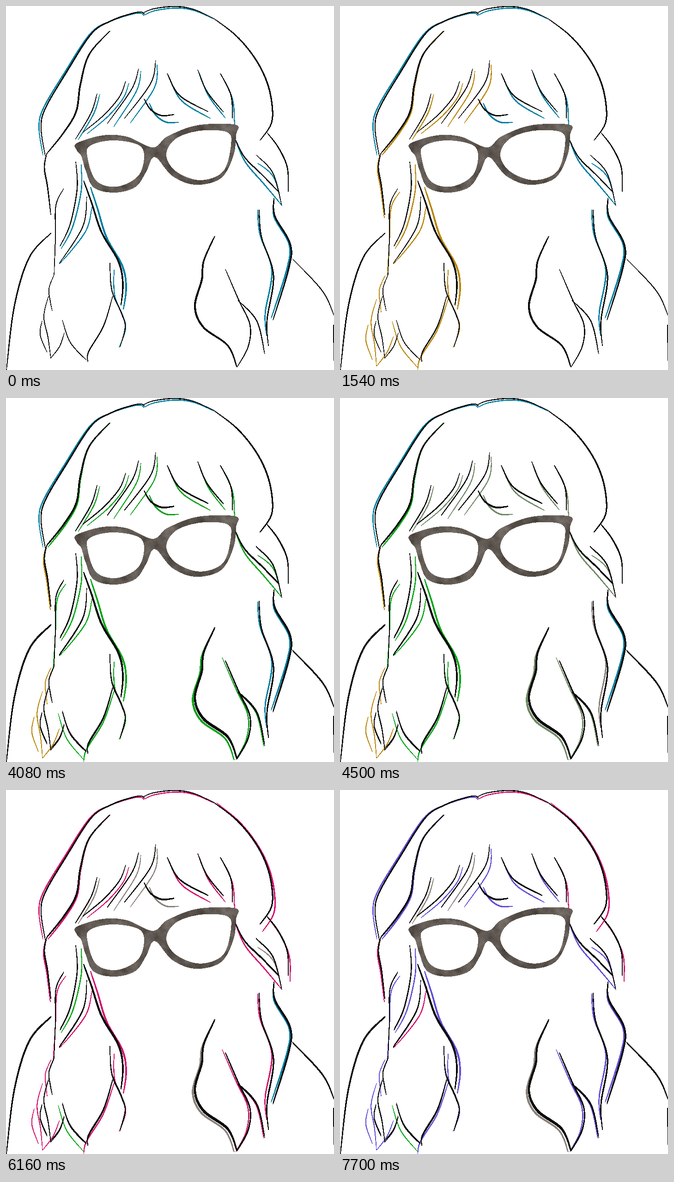
Recreate the animation shown at these times as an HTML page. Size 710 by 788 pixels, loop 8 s.

```html
<!DOCTYPE html>
<html lang="en">
<head>
<meta charset="utf-8">
<title>Line portrait with glasses</title>
<style>
html, body { margin: 0; width: 100%; height: 100%; overflow: hidden; background: #fff; }
svg { display: block; width: 100%; height: 100%; }
</style>
</head>
<body>
<svg viewBox="0 0 710 788" shape-rendering="crispEdges">
  <filter id="mottle" x="0" y="0" width="1" height="1" color-interpolation-filters="sRGB">
    <feTurbulence type="fractalNoise" baseFrequency=".035" numOctaves="4" seed="4"/>
    <feColorMatrix values=".35 0 0 0 .21  .35 0 0 0 .18  .35 0 0 0 .155  0 0 0 0 1"/>
    <feComposite in2="SourceAlpha" operator="in"/>
  </filter>
  <g id="shadows"></g>
  <use id="echo" href="#ink" transform="scale(1 .9965)"/>
  <g id="ink" fill="#0b0b0b">
    <path id="glasses" filter="url(#mottle)" fill-rule="evenodd"/>
  </g>
</svg>
<script>
const COLORS = {
  b: [0, 127, 162], g: [184, 134, 11], n: [4, 166, 20],
  y: [140, 130, 123], p: [212, 20, 110], v: [96, 80, 216]
};
const inkLayer = document.getElementById('ink');
const shadowLayer = document.getElementById('shadows');
const echo = document.getElementById('echo');
const shadows = [];

const parse = text => text.split(' ').map(pair => pair.split(',').map(Number));
const outline = points => 'M' + points.map(p => p.map(v => v.toFixed(2))).join('L') + 'Z';

// Samples a Catmull-Rom curve through the key points.
function smooth(keys, closed = false) {
  const count = keys.length, spans = closed ? count : count - 1, steps = 10, curve = [];
  const key = i => keys[closed ? (i + count) % count : Math.max(0, Math.min(count - 1, i))];
  for (let n = 0; n <= spans * steps; n++) {
    const i = Math.min(spans - 1, Math.floor(n / steps)), t = n / steps - i;
    const [a, b, c, d] = [-1, 0, 1, 2].map(k => key(i + k));
    curve.push([0, 1].map(k => {
      const cubic = 3 * (b[k] - c[k]) + d[k] - a[k];
      const square = 2 * a[k] - 5 * b[k] + 4 * c[k] - d[k];
      return b[k] + .5 * t * (c[k] - a[k] + t * (square + t * cubic));
    }));
  }
  return curve;
}

// Adds a curve as a brush stroke that swells in the middle.
function brush(layer, curve, width) {
  const end = curve.length - 1, left = [], right = [];
  curve.forEach(([x, y], n) => {
    const [x0, y0] = curve[Math.max(0, n - 1)], [x1, y1] = curve[Math.min(end, n + 1)];
    const length = Math.hypot(x1 - x0, y1 - y0) || 1;
    const swell = Math.sqrt(Math.max(0, Math.sin(Math.PI * n / end)));
    const half = Math.max(.65, width * (.4 + .6 * swell) / 2);
    const dx = (y0 - y1) / length * half, dy = (x1 - x0) / length * half;
    left.push([x + dx, y + dy]);
    right.unshift([x - dx, y - dy]);
  });
  const shape = document.createElementNS('http://www.w3.org/2000/svg', 'path');
  shape.setAttribute('d', outline([...left, ...right]));
  layer.append(shape);
  return shape;
}

const ink = (keys, width) => brush(inkLayer, smooth(parse(keys)), width);

// A black strand with a coloured shadow, whose offset glides from `start` to `end`.
// `states` holds one colour letter per hold; "-" is hidden.
function hair(keys, width, states, start, end = start) {
  ink(keys, width);
  const [from, to] = parse(`${start} ${end}`), curve = smooth(parse(keys));
  const shifted = curve.map((point, n) => point.map((v, k) =>
    v + from[k] + (to[k] - from[k]) * n / (curve.length - 1)));
  shadows.push({ states, shape: brush(shadowLayer, shifted, width + .2) });
}

// Crown and outer hair
hair('300,18 292,13 270,17 228,32 185,60 130,145 85,222 76,265 85,325', 3, 'bbbbpv', '-1,3', '-5,-2');
hair('297,15 320,6 365,1 405,7 450,27', 2.4, 'bbbbpp', '2,5', '2,2');
hair('450,27 500,66 540,115 565,165 576,215 574,255 550,291', 3.4, '----pp', '6,1', '5,16');
hair('565,274 590,307 609,350 611,402', 2.8, '----pp', '5,6', '4,13');
hair('225,54 180,105 161,170 152,228 125,274 88,320', 3.8, '-gnnpv', '-1,0', '3,3');
hair('88,320 83,350 90,392 97,452', 3, '-gggpp', '-2,3', '-1,7');
// Fringe
hair('197,190 184,232 150,289', 2.2, 'bgnyyy', '6,1');
hair('259,163 246,196 212,236 166,274', 2.2, 'bgnypv', '7,4', '9,3');
hair('287,136 272,180 219,255', 2.2, 'bgnyyy', '5,5', '14,7');
hair('324,118 313,168 256,244', 2.2, 'bgnyyv', '3,9', '13,10');
hair('299,201 313,224 336,237 364,235', 3.2, 'bbnyyv', '11,9', '10,17');
hair('349,146 376,194 438,229', 2.8, 'bbnypv', '4,8', '5,15');
hair('415,138 435,185 471,230', 2.5, 'bbnypv', '3,6', '4,13');
hair('464,146 487,193 490,243', 2.6, 'bbnypp', '1,1', '5,15');
// Locks beside the face
hair('497,290 517,328 555,366 592,404', 2.8, 'bbnypv', '0,2', '5,28');
hair('541,322 578,362 597,432', 2.2, 'bbnyyv', '3,18', '0,0');
hair('151,337 154,395 139,472 117,520', 2.5, 'bgnnnv', '12,6', '2,6');
hair('175,413 166,478 115,558', 2.3, 'bgnnpp', '12,20', '0,1');
hair('168,378 185,425 207,490 243,552 253,600 249,648', 4, 'bgnnpv', '15,14', '5,9');
hair('225,556 229,615 250,665 258,695 247,738', 2.6, 'bgnnpv', '9,15', '-2,1');
hair('231,628 211,693 179,748 177,770', 2.6, '-gnnpv', '4,4', '-9,17');
// Lower left ends
hair('125,395 108,432 107,500 104,582', 2.2, '-gnnpv', '5,7', '-2,1');
hair('104,582 93,612 96,640 100,660', 2, '-gggpv', '-6,1', '-11,3');
hair('92,628 82,672 91,718 97,763', 2.1, '-gggpv', '-13,7', '-18,17');
hair('78,682 74,712 89,750', 2, '-gggpv', '-17,8', '-19,16');
hair('97,762 116,737 126,708', 2, '-gggpv', '-18,18', '-10,7');
hair('122,680 139,728 174,767', 2, '-gnnnn', '-9,3', '-6,16');
// Shoulders
ink('98,491 50,545 18,650 1,788', 3.2);
ink('620,547 685,617 710,670', 2.2);
ink('709,690 710,768', 2);
// Right locks
hair('452,498 428,552 424,592 409,650 427,695 480,735 500,782', 4.4, '--nyyy', '-3,5', '-6,2');
hair('475,570 504,637 528,690 524,738 500,782', 2.6, '--nypv', '-7,-8', '-2,1');
hair('502,637 543,682 560,753', 2.6, '--nypv', '-2,-3', '-2,1');
hair('548,441 553,500 579,583 565,680 568,736', 3, 'bbbypv', '-3,0', '-4,-22');
hair('580,416 582,455 615,515 612,568 578,680', 3.8, 'bbbbbv', '0,5', '-4,-4');

const rim = '153,297 210,280 262,283 318,306 350,282 415,258 497,257 498,280 492,325 465,373 '
  + '410,387 360,368 322,327 303,360 280,392 235,404 190,393 172,355 163,325 153,312';
const leftLens = '176,325 183,302 230,291 285,300 299,325 286,368 240,391 195,378';
const rightLens = '347,322 368,287 420,270 478,273 487,300 470,358 420,377 368,358';
document.getElementById('glasses').setAttribute('d',
  [rim, leftLens, rightLens].map(keys => outline(smooth(parse(keys), true))).join(''));

// Hidden and base-blue shadows switch past the halfway step; the others blend.
function colorAt(states, index, fade) {
  const from = states[index], to = states[Math.min(states.length - 1, index + 1)];
  if (from === '-' || from === 'b') {
    const letter = fade > .5 ? to : from;
    return letter === '-' ? 'none' : `rgb(${COLORS[letter]})`;
  }
  return `rgb(${COLORS[from].map((v, k) => Math.round(v + (COLORS[to][k] - v) * fade))})`;
}

const LOOP = 8000, HOLD = 1000, CYCLE = 1540, STEP = 60;
function draw() {
  const t = performance.now() % LOOP - HOLD;
  const index = Math.max(0, Math.floor(t / CYCLE));
  const fade = t < 0 ? 0 : Math.min(1, (Math.floor(t % CYCLE / STEP) + 1) / 10);
  for (const { states, shape } of shadows) shape.setAttribute('fill', colorAt(states, index, fade));
  echo.setAttribute('visibility', index + fade > 1.5 ? 'visible' : 'hidden');
  requestAnimationFrame(draw);
}
draw();
</script>
</body>
</html>
```
